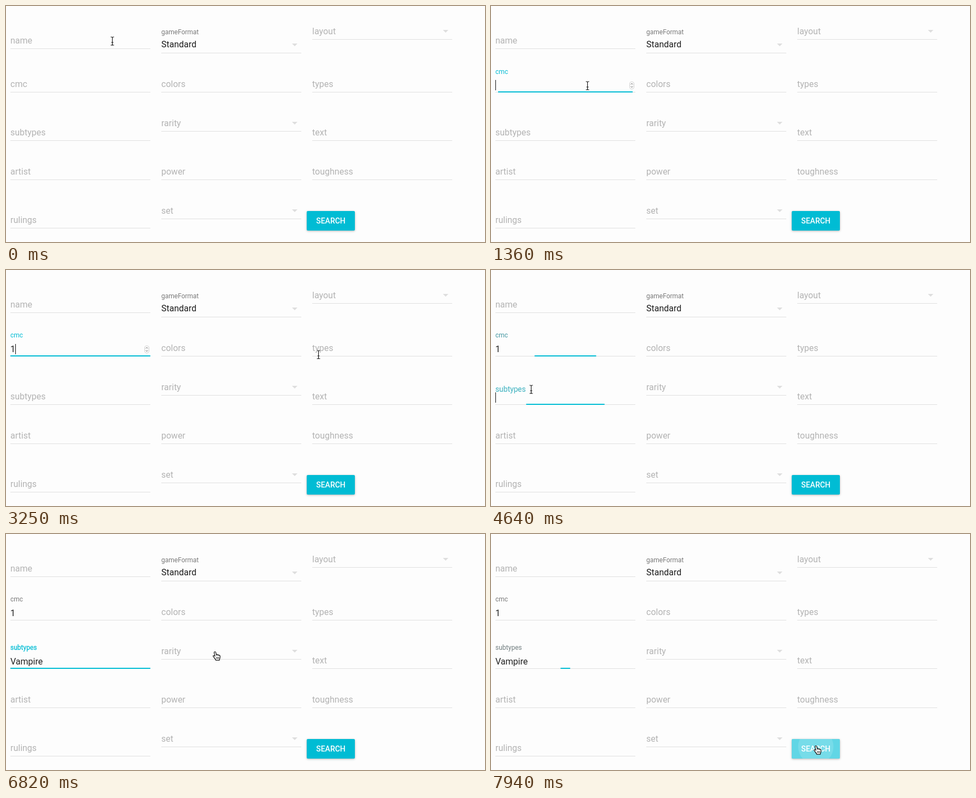
Animation, 876 px wide and 434 px high, one loop 8 s. Source, as an HTML page:

```html
<!DOCTYPE html>
<html lang="en">
<head>
<meta charset="utf-8">
<title>Card search form</title>
<style>
  html, body { margin: 0; width: 100%; height: 100%; overflow: hidden; background: #fdfdfd; }
  svg { display: block; width: 876px; height: 434px; font: 16px Roboto, "Noto Sans", sans-serif; }
  .raised { filter: drop-shadow(0 1px 2px rgba(0, 0, 0, .2)) drop-shadow(0 1px 1px rgba(0, 0, 0, .1)); }
</style>
</head>
<body>
<svg id="stage" viewBox="0 0 876 434">
  <defs>
    <clipPath id="buttonShape"><rect x="550" y="377" width="88" height="36" rx="2"/></clipPath>
    <path id="beam" fill="none" d="M-3 -7.5H-1.5Q0 -7.5 0 -6V6Q0 7.5 -1.5 7.5H-3M3 -7.5H1.5Q0 -7.5 0 -6M3 7.5H1.5Q0 7.5 0 6M-2 2.5H2"/>
  </defs>
  <g id="form"></g>
  <g id="spinner" fill="none">
    <rect x="253.5" y="139.5" width="8" height="13" rx="3.5" fill="#fff" stroke="#d2d2d2"/>
    <path d="M255.5 144.3L257.5 142.3L259.5 144.3M255.5 147.7L257.5 149.7L259.5 147.7" stroke="#555"/>
  </g>
  <rect class="raised" x="550" y="377" width="88" height="36" rx="2" fill="#00bcd4"/>
  <g clip-path="url(#buttonShape)" fill="#fff">
    <rect id="hover" x="550" y="377" width="88" height="36"/>
    <circle id="ripple" cx="594" cy="391" opacity=".14"/>
  </g>
  <text x="594" y="400" text-anchor="middle" font-size="14" font-weight="500" fill="#fff">SEARCH</text>
  <rect id="caret" width="1" height="19" fill="#111"/>
  <g id="pointer">
    <g id="ibeam">
      <use href="#beam" stroke="#fff" stroke-width="2.6"/>
      <use href="#beam" stroke="#111" stroke-width="1.1"/>
    </g>
    <g id="hand" transform="translate(-4.8 -.8)" stroke="#111" stroke-linejoin="round">
      <path fill="#fff" stroke-width="1.2" d="M4.5 .8C5.6 .8 6 1.6 6.1 2.5L6.8 6C7.5 5.4 8.8 5.5 9.1 6.6C10 6 11.2 6.3 11.5 7.3C12.7 6.9 13.8 7.6 13.8 9V11C13.8 13 12.8 13.5 12.5 16.5H6C5.6 14.5 4 12.8 2.6 11.2C1.4 9.8 .6 8.9 1.2 8.2C2 7.3 3.6 8.2 4.4 9.2L3 2.6C2.8 1.5 3.5 .8 4.5 .8Z"/>
      <path fill="none" stroke-width=".9" d="M7.3 10.5V14M9.3 10.5V14M11.3 10.5V14M6.8 6L7.1 8M9.1 6.6V8M11.5 7.3V8.5"/>
    </g>
  </g>
</svg>
<script>
const LOOP = 8000, WIDTH = 256;
const TEAL = [0, 188, 212], HINT = [179, 179, 179], LABEL = [122, 122, 122];
const byId = id => document.getElementById(id);
const form = byId('form');

function add(tag, attrs, text = '') {
  const el = document.createElementNS('http://www.w3.org/2000/svg', tag);
  set(el, attrs);
  el.textContent = text;
  return form.appendChild(el);
}
function set(el, attrs) {
  for (const key in attrs) el.setAttribute(key, attrs[key]);
}
const show = (el, on) => set(el, { visibility: on ? 'visible' : 'hidden' });
const mix = (a, b, p) => a + (b - a) * p;
const blend = (a, b, p) => `rgb(${a.map((v, i) => Math.round(mix(v, b[i], p)))})`;
const clamp = v => Math.min(1, Math.max(0, v));

// cubic-bezier(x1, 1, x2, 1), whose value is 1 - (1 - s)^3
function bezier(x, x1, x2) {
  let lo = 0, hi = 1;
  for (let i = 0; i < 24; i++) {
    const s = (lo + hi) / 2, r = 1 - s;
    if (3 * r * r * s * x1 + 3 * r * s * s * x2 + s ** 3 < x) lo = s; else hi = s;
  }
  return 1 - (1 - lo) ** 3;
}
// Transitions become visible a moment after they begin.
function transition(t, start, duration = 450) {
  return t - start < 45 ? 0 : bezier(clamp((t - start) / duration), .23, .32);
}

function underline(x, y) {
  add('rect', { x, y, width: WIDTH, height: 1, fill: '#e0e0e0' });
}
function plainField(label, x, y) {
  underline(x, y);
  add('text', { x, y: y - 9, fill: blend(HINT, HINT, 0) }, label);
}
function arrow(x, y) {
  add('path', { d: `M${x + 239} ${y - 17}h10l-5 5z`, fill: '#dedede' });
}
function selectField(label, x, y) {
  plainField(label, x, y);
  arrow(x, y);
}
function liveField(label, y, focus, blur, typed, weight) {
  underline(8, y);
  const labelEl = add('text', {}, label);
  const value = add('text', { x: 8, y: y - 7, fill: '#212121' });
  const bar = add('rect', { y: y - 1, height: 2, fill: '#00bcd4' });
  return {
    y, value,
    update(t) {
      const up = transition(t, focus), out = transition(t, blur);
      const active = up * (1 - out);
      const base = out > 0 ? LABEL : HINT, color = blend(base, TEAL, active);
      set(labelEl, {
        transform: `translate(8 ${mix(y - 9, y - 34, up)}) scale(${mix(1, .75, up)})`,
        fill: color, stroke: color, 'stroke-width': weight * active
      });
      set(bar, { x: 8 + WIDTH * (1 - active) / 2, width: WIDTH * active });
      value.textContent = typed(t);
    }
  };
}

plainField('name', 8, 78);
underline(284, 86);
arrow(284, 86);
add('text', { x: 284, y: 52, 'font-size': 12, fill: blend(LABEL, LABEL, 0) }, 'gameFormat');
add('text', { x: 284, y: 76, fill: '#1c1c1c' }, 'Standard');
selectField('layout', 560, 61);
plainField('colors', 284, 158);
plainField('types', 560, 158);
selectField('rarity', 284, 230);
plainField('text', 560, 247);
['artist', 'power', 'toughness'].forEach((label, i) => plainField(label, 8 + 276 * i, 319));
plainField('rulings', 8, 408);
selectField('set', 284, 391);

const typeSubtype = t =>
  'Vampire'.slice(0, t < 5700 ? 0 : t < 5930 ? 1 : 2 + Math.floor((t - 5930) / 72));
const cmc = liveField('cmc', 158, 1143, 4573, t => t < 2240 ? '' : '1', 0);
const subtypes = liveField('subtypes', 247, 4573, 7756, typeSubtype, .35);

const caretOn = [[1190, 1640], [2120, 2740], [3240, 3720], [4240, 5090], [5580, 6790], [7420, 7830]];
const handOn = [[6750, 6890], [7150, LOOP]];
const within = (t, spans) => spans.some(([from, to]) => t >= from && t < to);

// time, x, y
const route = [
  [0, 194, 64], [59, 194, 64], [60, 195, 64], [210, 195, 64], [400, 162, 110], [550, 147, 150],
  [700, 158, 174], [850, 172, 155], [950, 176, 146],
  [2650, 176, 146], [2820, 265, 138], [3050, 450, 166], [3250, 571, 155],
  [3660, 571, 155], [3720, 565, 155], [3900, 565, 155], [4050, 430, 172], [4200, 215, 202],
  [4320, 98, 217], [4410, 73, 219],
  [6590, 73, 219], [6700, 200, 206], [6820, 382, 216], [7000, 460, 268], [7200, 560, 345],
  [7360, 594, 383], [7500, 594, 388], [7650, 594, 389]
];
function pointerAt(t) {
  const i = route.findIndex(p => p[0] > t);
  if (i < 0) return route[route.length - 1].slice(1);
  const [t0, x0, y0] = route[i - 1], [t1, x1, y1] = route[i];
  const p = (t - t0) / (t1 - t0);
  return [mix(x0, x1, p), mix(y0, y1, p)];
}

function draw(t) {
  cmc.update(t);
  subtypes.update(t);

  const field = t < 4640 ? cmc : subtypes;
  const caretX = field.value.textContent ? 8 + field.value.getComputedTextLength() : 8;
  set(byId('caret'), { x: Math.round(caretX), y: field.y - 22 });
  show(byId('caret'), within(t, caretOn));
  show(byId('spinner'), t >= 380 && t < 4640);

  set(byId('hover'), { opacity: .38 * bezier(clamp((t - 7390) / 450), .23, .32) });
  set(byId('ripple'), { r: 50 * transition(t, 7756, 1000) });

  const [x, y] = pointerAt(t), hand = within(t, handOn);
  set(byId('pointer'), { transform: `translate(${Math.round(x) + .5} ${Math.round(y) + .5})` });
  show(byId('hand'), hand);
  show(byId('ibeam'), !hand);
}

const began = performance.now();
function tick() {
  draw((performance.now() - began) % LOOP);
  requestAnimationFrame(tick);
}
tick();
</script>
</body>
</html>
```
